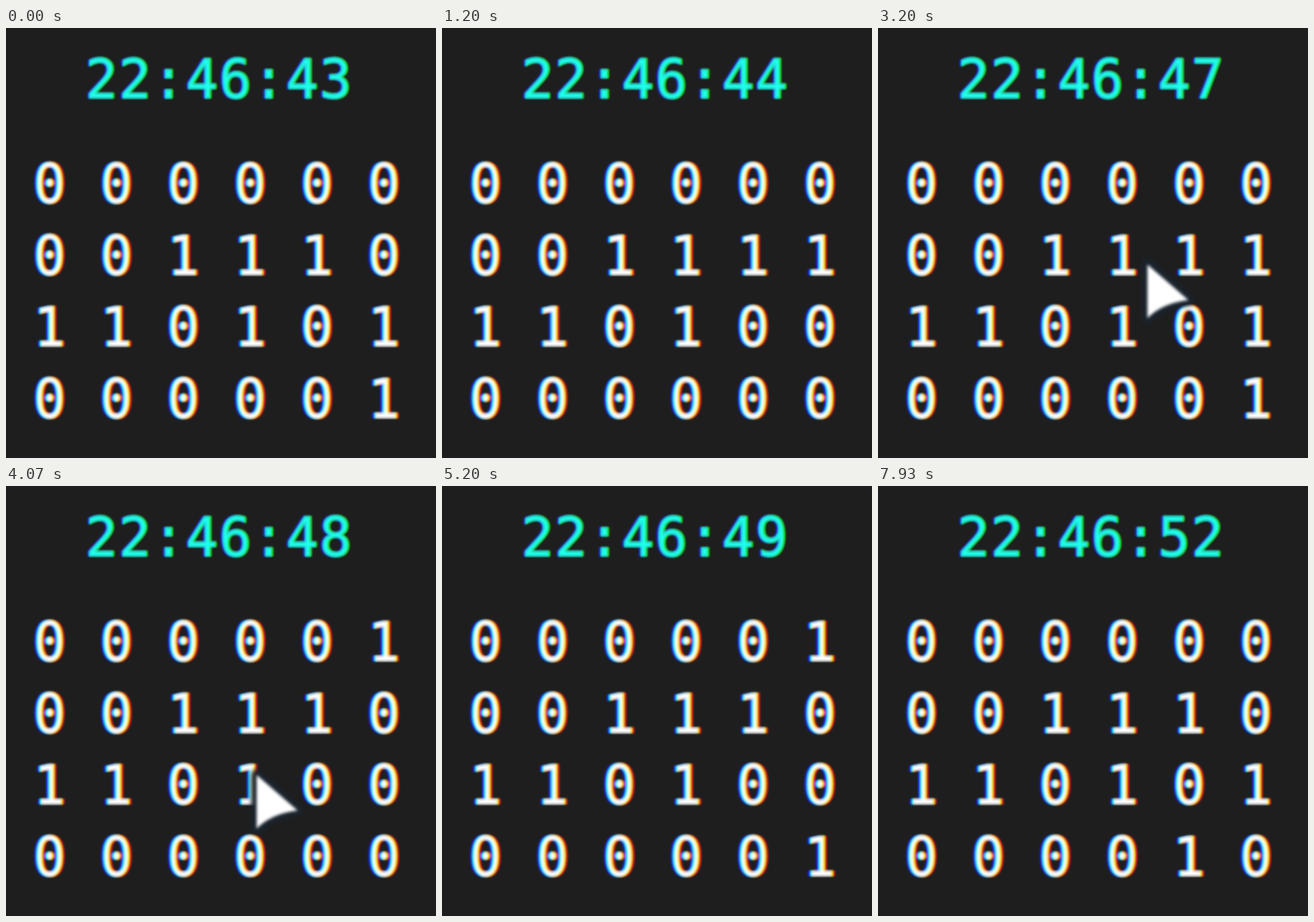
Animation, 640 px wide and 640 px high, one loop 8000 ms. Source, as an HTML page with a canvas:

```html
<!DOCTYPE html>
<html lang="en">
<head>
<meta charset="utf-8">
<title>Binary clock</title>
<style>
  html, body { margin: 0; width: 100%; height: 100%; overflow: hidden; background: #1e1e1e; }
  canvas { display: block; width: 100vw; height: 100vh; }
</style>
</head>
<body>
<canvas id="stage" width="640" height="640"></canvas>
<script>
const ctx = document.getElementById('stage').getContext('2d');
const LOOP = 8000, FPS = 15;
const FONT = '80px "DejaVu Sans Mono", "Noto Sans Mono", monospace';

// Pointer tip: time, x, y
const path = [
  [1930, 120, 292], [2067, 230, 329], [2600, 330, 338], [3200, 400, 350],
  [3600, 398, 372], [4067, 372, 428], [4400, 385, 434], [4870, 606, 532]
];

// Subpixel-style lettering: each colour channel sits slightly aside
function fringedText(text, x, y, channels) {
  channels.forEach(([color, dx]) => {
    ctx.fillStyle = ctx.strokeStyle = color;
    ctx.fillText(text, x + dx, y);
    ctx.strokeText(text, x + dx, y);
  });
}
const white = [['#f00', 2.6], ['#0f0', 0], ['#00f', -2.6]];
const cyan = [['#0f0', 0.6], ['#00e8', -1.8]].map(([c, dx]) => [c === '#0f0' ? c : '#0000eb', dx]);

function pointerAt(t) {
  const i = path.findIndex(p => p[0] > t);
  if (i < 1) return null;
  const [t0, x0, y0] = path[i - 1], [t1, x1, y1] = path[i];
  const u = (t - t0) / (t1 - t0), k = u * u * (3 - 2 * u);
  return [x0 + (x1 - x0) * k, y0 + (y1 - y0) * k];
}

function drawPointer(x, y) {
  ctx.save();
  ctx.translate(x, y);
  ctx.beginPath();
  ctx.moveTo(1, 2);
  ctx.lineTo(1, 82);
  ctx.quadraticCurveTo(22, 60, 62, 55);
  ctx.closePath();
  ctx.lineJoin = 'round';
  ctx.filter = 'blur(3px)';
  ctx.strokeStyle = '#1a242e';
  ctx.lineWidth = 16;
  ctx.stroke();
  ctx.filter = 'blur(2px)';
  ctx.fillStyle = '#fff';
  ctx.fill();
  ctx.restore();
}

function draw(t) {
  // The display refreshes once a second and skips one value
  const n = Math.floor((t + 670) / 1000);
  const digits = '2246' + (43 + n + (n > 2 ? 1 : 0));

  ctx.fillStyle = '#1e1e1e';
  ctx.fillRect(0, 0, 640, 640);

  ctx.save();
  ctx.font = FONT;
  ctx.letterSpacing = '1.6px';
  ctx.lineWidth = 2;
  ctx.lineJoin = 'round';
  ctx.globalCompositeOperation = 'lighten';
  ctx.filter = 'blur(1.8px)';
  fringedText(digits.match(/../g).join(':'), 118, 103.5, cyan);
  for (let row = 0; row < 4; row++) {
    const bits = [...digits].map(d => d >> (3 - row) & 1).join(' ');
    fringedText(bits, 40.5, 260 + row * 106.7, white);
  }
  ctx.restore();

  const pointer = pointerAt(t);
  if (pointer) drawPointer(...pointer);
}

let last = -1;
function tick() {
  const t = performance.now() % LOOP;
  const step = Math.floor((t + 4) * FPS / 1000) % (LOOP * FPS / 1000);
  if (step !== last) {
    last = step;
    draw(step * 1000 / FPS);
  }
  requestAnimationFrame(tick);
}
tick();
</script>
</body>
</html>
```
